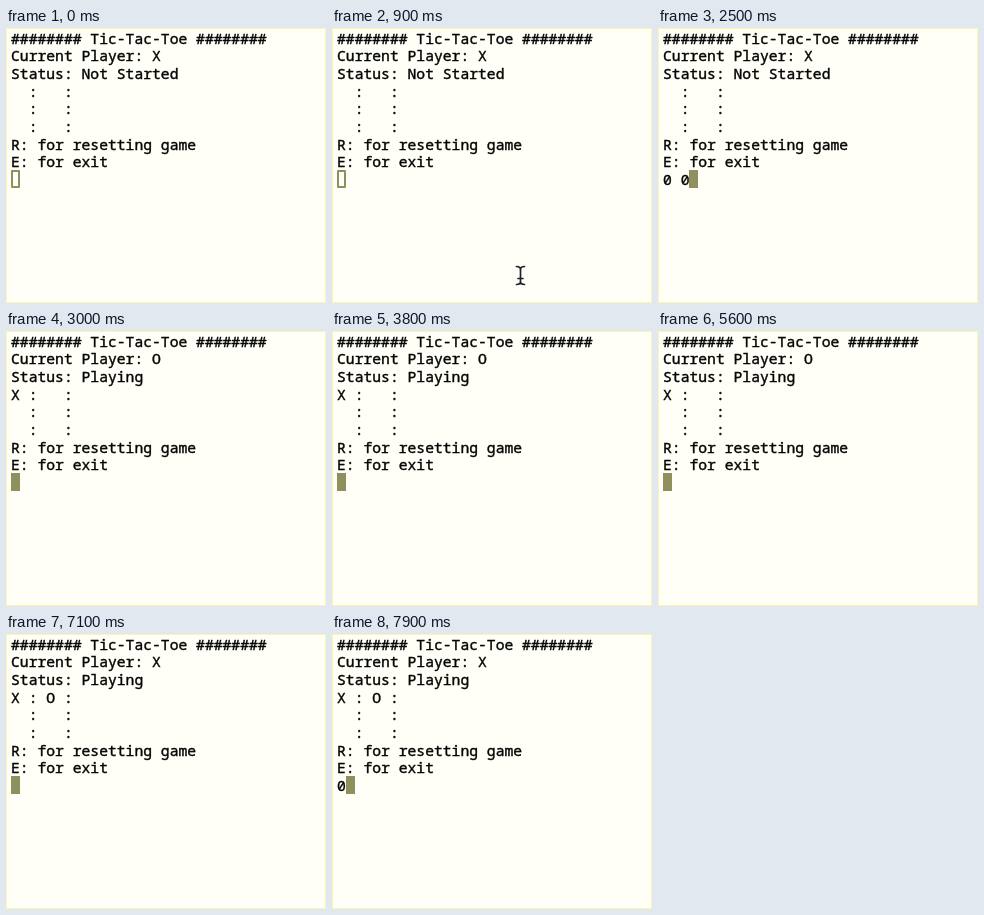
Animation, 320 px wide and 275 px high, one loop 8 s. Source, as an HTML page with a canvas:

```html
<!DOCTYPE html>
<html lang="en">
<head>
<meta charset="utf-8">
<title>Tic-Tac-Toe terminal</title>
<style>
  html, body { margin: 0; width: 100%; height: 100%; overflow: hidden; background: #fffff8; }
  canvas { display: block; }
</style>
</head>
<body>
<canvas id="stage" width="320" height="275"></canvas>
<script>
const ctx = document.getElementById('stage').getContext('2d');
const LOOP = 8000, STEP = 100;
const LEFT = 5, BASE = 15.5, CELL = 8.82, LINE = 17.67;
const FOCUS_AT = 1300;
const PAPER = '#fffff8', INK = '#050505';

// Typed input and the board state it leads to
const inputs = [
  [0, ''], [1800, '0'], [2000, '0 '], [2300, '0 0'], [2600, ''],
  [6400, '0'], [6600, '0 '], [6800, '0 1'], [7100, ''], [7800, '0']
];
const states = [
  [0, 'X', 'Not Started', '  :   :'],
  [2600, 'O', 'Playing', 'X :   :'],
  [7100, 'X', 'Playing', 'X : O :']
];
// Pointer keys: time, x, y
const pointer = [[600, 194, 270], [900, 188.5, 247.5], [1200, 184, 232], [1800, 184, 232]];

const latest = (list, t) => list.filter(item => item[0] <= t).pop();

function pointerAt(t) {
  for (let i = 1; i < pointer.length; i++) {
    const [t0, x0, y0] = pointer[i - 1], [t1, x1, y1] = pointer[i];
    if (t >= t0 && t < t1) {
      const k = (t - t0) / (t1 - t0);
      return [x0 + (x1 - x0) * k, y0 + (y1 - y0) * k];
    }
  }
  return null;
}

function drawCaret(col, filled) {
  const x = Math.round(LEFT + col * CELL), y = 142;
  if (filled) {
    ctx.fillStyle = '#90905e';
    ctx.fillRect(x, y, 9, 18);
  } else {
    ctx.strokeStyle = '#90905e';
    ctx.lineWidth = 2;
    ctx.strokeRect(x + 1, y + 1, 7, 16);
  }
}

function drawText(line, row) {
  const y = BASE + row * LINE;
  ctx.fillText(line, LEFT, y);
  ctx.strokeText(line, LEFT, y); // thin outline gives a medium weight
}

function drawBeam(x, y) {
  ctx.save();
  ctx.translate(x, y);
  ctx.beginPath();
  for (const s of [-1, 1]) {
    ctx.moveTo(-4, 9 * s);
    ctx.quadraticCurveTo(0, 9 * s, 0, 6 * s);
    ctx.quadraticCurveTo(0, 9 * s, 4, 9 * s);
  }
  ctx.moveTo(0, -7);
  ctx.lineTo(0, 7);
  ctx.moveTo(-2.5, 3);
  ctx.lineTo(2.5, 3);
  ctx.lineCap = 'round';
  ctx.strokeStyle = '#fff';
  ctx.lineWidth = 3.4;
  ctx.stroke();
  ctx.strokeStyle = '#222';
  ctx.lineWidth = 1.7;
  ctx.stroke();
  ctx.restore();
}

function draw(t) {
  ctx.fillStyle = PAPER;
  ctx.fillRect(0, 0, 320, 275);
  ctx.strokeStyle = '#f8f6b0';
  ctx.lineWidth = 1;
  ctx.strokeRect(0.5, 0.5, 319, 274);

  const [, player, status, row] = latest(states, t);
  const typed = latest(inputs, t)[1];
  const lines = [
    '######## Tic-Tac-Toe ########',
    'Current Player: ' + player,
    'Status: ' + status,
    row, '  :   :', '  :   :',
    'R: for resetting game',
    'E: for exit',
    typed
  ];

  drawCaret(typed.length, t >= FOCUS_AT);
  ctx.font = '500 14.7px "Noto Sans Mono", "DejaVu Sans Mono", monospace';
  ctx.textBaseline = 'alphabetic';
  ctx.fillStyle = ctx.strokeStyle = INK;
  ctx.lineWidth = 0.4;
  ctx.lineJoin = 'round';
  lines.forEach(drawText);

  const p = pointerAt(t);
  if (p) drawBeam(...p);
}

const start = performance.now();
function tick() {
  const t = (performance.now() - start) % LOOP;
  draw(Math.floor(t / STEP) * STEP);
  requestAnimationFrame(tick);
}
tick();
</script>
</body>
</html>
```
